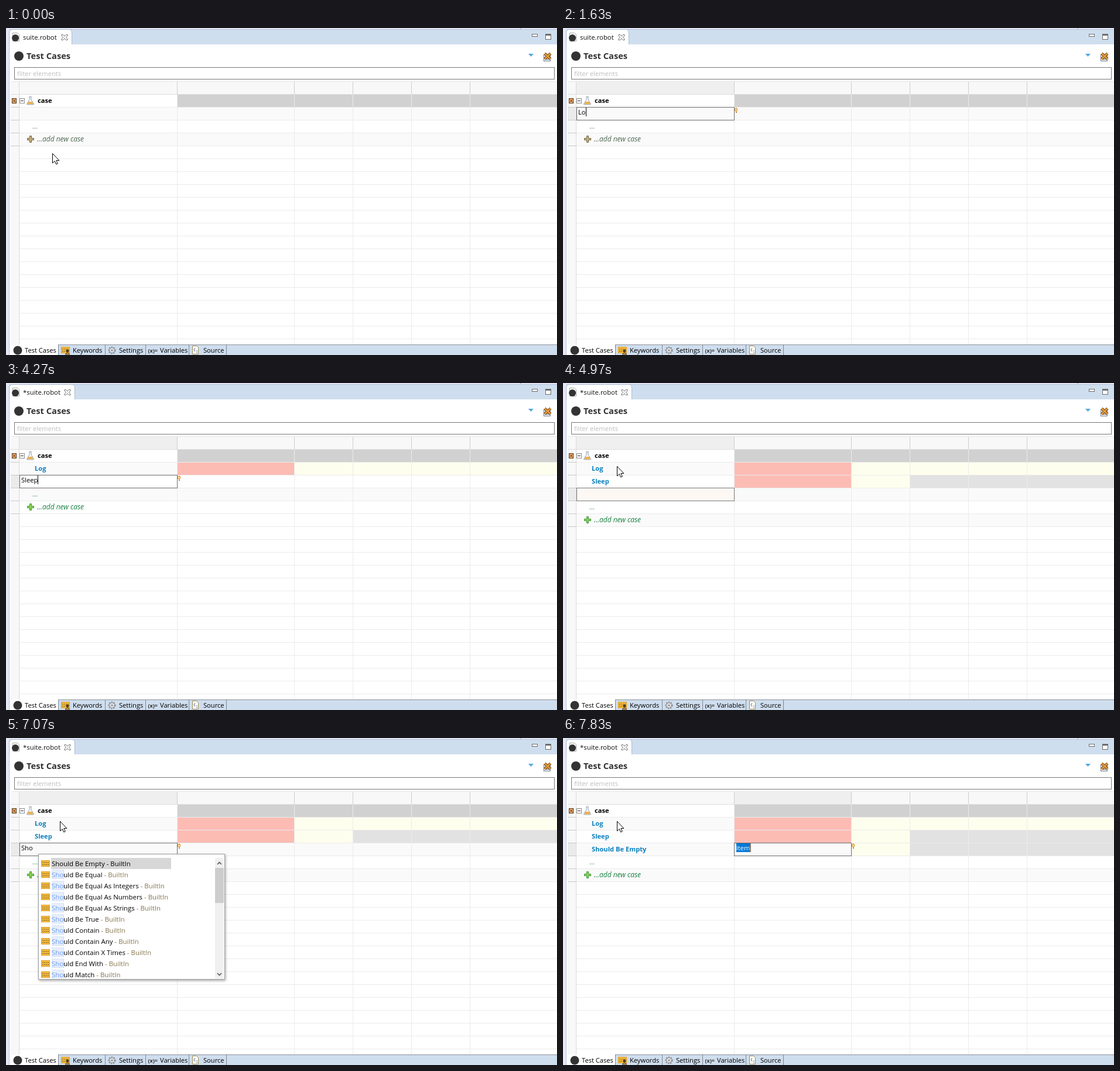
Animation of 941 by 559 pixels, one loop 8000 ms. Source, as an HTML page:

```html
<!DOCTYPE html>
<html lang="en">
<head>
<meta charset="utf-8">
<title>Test case editor</title>
<style>
html, body { margin: 0; width: 100%; height: 100%; overflow: hidden; background: #fff; }
svg { display: block; }
text { font: 11.15px "Open Sans", "Noto Sans", sans-serif; white-space: pre; }
rect { shape-rendering: crispEdges; }
.b { font-weight: 700; }
.tab { font-size: 11.35px; }
.h { font-size: 14.7px; font-weight: 700; }
.i { font-size: 11.95px; font-style: italic; }
.li { font-size: 11.45px; }
.doc { font: 13.2px "Liberation Sans", Arial, sans-serif; }
.doc.b { font-weight: 700; }
.doc.t { font-size: 15.5px; font-weight: 700; }
.code { font: 13.2px "Liberation Mono", monospace; }
.code.b { font-weight: 700; }
.pop { filter: drop-shadow(1px 2px 2px rgba(0,0,0,.35)); }
</style>
</head>
<body>
<svg id="stage" width="941" height="559" viewBox="0 0 941 559" xmlns="http://www.w3.org/2000/svg"></svg>
<script>
const LOOP = 8000, W = 941, TOP = 113, ROW = 22;
const COLS = [22, 292, 492, 592, 692, 792, W];
const BLUE = '#0a7fbd', PINK = '#fcbcb4', CREAM = '#fefeee', GREY = '#e2e2e2', LINK = '#c2401f';
const stage = document.getElementById('stage');

const edits = [
  { row: 1, word: 'Log', at: [1380, 1630, 1860], end: 2390 },
  { row: 2, word: 'Sleep', at: [3630, 3860, 4030, 4180, 4270], end: 4970 },
  { row: 3, word: 'Sho', at: [5750, 6130, 6220], end: 7760 }
];
const steps = [0, 70, 145, 220, 295, 370, 530, 2390, 2500, 4820, 4970, 6530, 7070, 7300, 7530, 7760, 7830]
  .concat(...edits.map(e => e.at)).sort((a, b) => a - b);
const proposals = ['Be Empty', 'Be Equal', 'Be Equal As Integers', 'Be Equal As Numbers', 'Be Equal As Strings',
  'Be True', 'Contain', 'Contain Any', 'Contain X Times', 'End With', 'Match'];

const within = (t, a, b) => t >= a && t < b;
const rowY = r => TOP + ROW * r;
const box = (x, y, w, h, fill, extra = '') => `<rect x="${x}" y="${y}" width="${w}" height="${h}" fill="${fill}" ${extra}/>`;
const frame = (x, y, w, h, fill, stroke) => box(x + .5, y + .5, w - 1, h - 1, fill, `stroke="${stroke}"`);
const text = (x, y, s, cls = '', fill = '#000') => `<text x="${x}" y="${y}" class="${cls}" fill="${fill}">${s}</text>`;
const path = (d, fill, stroke = 'none', w = 1) => `<path d="${d}" fill="${fill}" stroke="${stroke}" stroke-width="${w}"/>`;
const dot = (x, y, r, fill) => `<circle cx="${x}" cy="${y}" r="${r}" fill="${fill}"/>`;

function keywordIcon(x, y) {
  return `<rect x="${x + .5}" y="${y + .5}" width="14" height="10" rx="1" fill="#f6bb3c" stroke="#dc9d27"/>` +
    path(`M${x + 2} ${y + 4}h11M${x + 2} ${y + 7.5}h2m1 0h5m1 0h2`, 'none', '#6d5420', 1)
      .replace('/>', ' stroke-dasharray="2 1"/>');
}

function closeIcon(x, y) {
  return path(`M${x - 5} ${y - 4.5}h2.5l2.5 2.5 2.5 -2.5h2.5v2l-2.7 2.5 2.7 2.5v2h-2.5l-2.5 -2.5 -2.5 2.5h-2.5v-2l2.7 -2.5 -2.7 -2.5z`,
    '#fff', '#6b6b6b');
}

function titleBar(dirty) {
  const right = dirty ? 118 : 113;
  return box(0, 0, W, 28, '#e6e9f5') + box(0, 0, 5, 559, '#e6e9f5') +
    box(878, 0, 2, 2, '#bcc6dc') +
    box(5, 2, W - 5, 26, '#cfdeee') + box(8, 2, W - 8, 1, '#b5c4dc') +
    box(5, 6, 1, 553, '#b9c5dd') +
    path(`M5.5 28V8Q5.5 3 11 2.5H${right - 5}Q${right - .5} 3 ${right - .5} 8V28`, '#fff', '#a9bad4') +
    path('M11.5 8.5h8l3 3v11h-11z', '#fff', '#a3a89e') + dot(16, 17, 6, '#333') +
    text(29, 20, (dirty ? '*' : '') + 'suite.robot', 'tab', '#111') +
    closeIcon(right - 13, 16) +
    frame(898, 10, 10, 5, '#fff', '#6c6c6c') +
    frame(921, 10, 10, 10, '#fff', '#6c6c6c') + box(921, 11, 10, 2, '#6c6c6c');
}

function heading() {
  return dot(22, 48, 8, '#333') + text(35, 53, 'Test Cases', 'h', '#333') +
    path('M892 44h9l-4.5 5z', '#55a8dc') +
    frame(918, 45, 12, 12, '#e9eef4', '#75808c') + path('M920 53.5h8M920 50.5h4', 'none', '#75808c') +
    path('M920 43.5l10 9.5M930 43.5l-10 9.5', 'none', '#6d4414', 4.6) +
    path('M920 43.5l10 9.5M930 43.5l-10 9.5', 'none', '#e59a3b', 2.6) +
    frame(14, 67, 923, 21, '#fff', '#777') + text(19, 82, 'filter elements', '', '#bdbdbd');
}

function bottomTabs() {
  const seps = [89, 169, 238, 312, 376].map(x => box(x, 541, 1, 18, '#7f868e')).join('');
  return box(6, 541, W, 18, '#fff') + box(89, 541, W - 89, 18, '#cfdeee') + box(89, 541, W - 89, 1, '#8b9199') + seps +
    dot(20, 551, 7.5, '#333') + text(32, 555, 'Test Cases') +
    keywordIcon(94, 545) + dot(105, 552, 2.5, '#4c3d20') + path('M101 558q4 -6 8 0z', '#e9a23a', '#4c3d20') +
    text(114, 555, 'Keywords') +
    `<circle cx="181" cy="551" r="5.5" fill="#e6e8ea" stroke="#84898f" stroke-width="2" stroke-dasharray="2.4 1.6"/>` +
    `<circle cx="181" cy="551" r="4.2" fill="#e6e8ea" stroke="#84898f"/>` + dot(181, 551, 1.6, '#84898f') +
    text(193, 555, 'Settings') +
    `<text x="242.5" y="555" class="b" style="font-size:9px" fill="#333">(x)=</text>` + text(263, 555, 'Variables') +
    path('M318.5 543.5h7l3 3v11h-10z', '#fffdf4', '#a08a5a') + path('M323 547l-2 3 2 3M325 552h2M325 555h2', 'none', '#4b6ea0') +
    text(337, 555, 'Source');
}

function caseRow() {
  const y = TOP + 11;
  return box(293, TOP + 1, W - 293, 21, '#d1d1d1') +
    frame(10, y - 4, 8, 9, '#ffd9a0', '#4b2c10') + path(`M11.8 ${y - 2}l4.4 5M16.2 ${y - 2}l-4.4 5`, 'none', '#a34b12', 1.6) +
    frame(23, y - 4, 9, 9, '#fff', '#8b8b8b') + box(25, y, 5, 1, '#333') +
    path('M39.5 117.5h4M40 117.5v5l-4.5 7.5q0 1 1 1h10q1 0 1 -1l-4.5 -7.5v-5', '#f6f9fc', '#8f9dac') +
    path('M38.5 126h6l2.3 4.3h-10.6z', '#eeb04c') +
    text(54, y + 4, 'case', 'b');
}

// argument cells: required, optional, then unused
function argCells(r, word) {
  const y = rowY(r) + 1, h = ROW - 1, open = word === 'Log';
  return box(293, y, 199, h, PINK) + box(493, y, open ? W - 493 : 99, h, CREAM) +
    (open ? '' : box(593, y, W - 593, h, GREY));
}

function grid(s) {
  const last = s.n + 2, [hx, hr] = [COLS[s.col], COLS[s.col + 1]];
  let g = box(8, 91, W - 8, 22, '#f8f8f8') + box(8, 91, 14, 450, '#f8f8f8') + box(8, 91, W - 8, 1, '#e9e9e9');
  if (s.selected) {
    g += box(hx + 1, 92, hr - hx - 1, 21, '#efefef') + box(8, rowY(s.row) + 1, 14, 21, '#ebebeb');
  }
  for (let r = 1; r <= last; r += 2) g += box(23, rowY(r) + 1, W - 23, 21, '#fafafa');
  g += caseRow();
  s.words.forEach((w, i) => g += argCells(i + 1, w));
  if (s.hover) g += box(23, rowY(s.hover) + 1, 269, 21, '#fef0e3');
  for (let y = rowY(1); y < 541; y += ROW) g += box(23, y, W - 23, 1, '#ebebeb');
  COLS.slice(0, 6).forEach(x => g += box(x, 92, 1, 21, '#cdcdcd') + box(x, 114, 1, 427, '#ebebeb'));
  g += box(8, TOP, W - 8, 1, '#dedede') + box(22, 92, 1, 449, '#dadada');
  for (let r = 0; r <= last; r++) g += box(8, rowY(r + 1), 15, 1, '#c9c9c9');
  if (s.selected && !s.editing) g += frame(23, rowY(s.row), 270, 23, s.hot ? '#fee4cb' : '#fef8f4', '#777');
  s.words.forEach((w, i) => g += text(49, rowY(i + 1) + 15, w, 'b', BLUE));
  const ink = s.dirty ? '#15803f' : '#4c6650', py = rowY(last) + 11;
  return g + text(45, rowY(last - 1) + 15, '...', '', ink) +
    path(`M40.5 ${py - 5.5}h3v4h4v3h-4v4h-3v-4h-4v-3h4z`, s.dirty ? '#8ed05c' : '#c9b183', s.dirty ? '#3c9636' : '#6a6440') +
    text(53, py + 4, '...add new case', 'i', ink);
}

function bulb(x, y) {
  return `<ellipse cx="${x}" cy="${y}" rx="1.9" ry="2.3" fill="#fff3cf" stroke="#dd8b26" stroke-width="1.2"/>` +
    box(x - 1, y + 3, 2, 2, '#b77a35');
}

function editor(s) {
  const y = rowY(s.row);
  return frame(23, y, 270, 23, s.row % 2 ? '#fafafa' : '#fff', '#6a6a6a') +
    `<text id="typed" x="26" y="${y + 13}">${s.typed}</text>` + bulb(295.5, y + 4.5) +
    (s.caret ? box(0, y + 1, 1, 15, '#000', 'id="caret"') : '');
}

function itemEditor() {
  const y = rowY(3);
  return frame(292, y, 201, 23, '#fafafa', '#6a6a6a') + box(296, y + 1, 24, 15, '#0078d7') +
    text(296, y + 13, 'item', '', '#fff') + box(320, y + 1, 1, 15, '#ff8728') + bulb(495.5, y + 4.5);
}

function proposalList() {
  let g = `<g class="pop">${frame(55, 198, 319, 215, '#fff', '#9d9d9d')}</g>` +
    `<clipPath id="view"><rect x="56" y="199" width="317" height="212"/></clipPath><g clip-path="url(#view)">`;
  proposals.forEach((p, i) => {
    const y = 214 + 19 * i;
    g += keywordIcon(60, y - 5);
    if (!i) g += box(77, y - 9, 205, 19, '#d7d7d7') + text(78, y + 5, `Should ${p} - BuiltIn`, 'li');
    else g += box(78.5, y - 7.5, 20, 15, '#e6eefc', 'stroke="#b8cdf3" stroke-dasharray="1 1"') +
      text(78, y + 5, `<tspan fill="#6f9df0">Sho</tspan>uld ${p}<tspan fill="#85754d"> - BuiltIn</tspan>`, 'li');
  });
  return g + '</g>' + box(357, 205, 15, 206, '#f0f0f0') + box(357, 222, 15, 60, '#cdcdcd') +
    path('M361 216l3.5 -3.5 3.5 3.5M361 402l3.5 3.5 3.5 -3.5', 'none', '#555', 1.6);
}

function docPopup() {
  const line = (x, y, w) => box(x, y, w, 1, LINK);
  return `<g class="pop">${frame(387, 199, 319, 215, '#fefee1', '#9d9d9d')}</g>` + keywordIcon(397, 218) +
    text(418, 229, 'Should Be Empty', 'doc t') +
    text(397.5, 261, 'Source:', 'doc b') +
    text(450, 262, `<tspan fill="${LINK}">BuiltIn</tspan> [<tspan fill="${LINK}">Documentation</tspan>]`, 'code', '#444') +
    line(450, 264, 56) + line(522, 264, 104) +
    text(397.5, 277, 'Arguments:', 'doc b') + text(477, 278, '[item, msg=None]', 'code', '#333') +
    text(397.5, 306, 'Verifies that the given item is empty.', 'doc') +
    text(397.5, 335, 'The length of the item is got using the', 'doc') +
    text(623, 335, 'Get Length', 'doc', LINK) + line(623, 337, 66) +
    text(397.5, 350, 'keyword. The default error message can be', 'doc') +
    text(397.5, 366, 'overridden with the', 'doc') + box(512, 355, 28, 15, '#e9e9df') +
    text(514, 367, 'msg', 'code b', '#444') + text(544, 366, 'argument.', 'doc');
}

function arrow(x, y) {
  return path(`M${x} ${y}v16.5l3.8 -3.5 2.4 5.4 2.6 -1.1 -2.4 -5.3h5z`, '#fff', '#000');
}

function pointer(t, x, y) {
  if (within(t, 1380, 1630)) return path('M90.5 136.5h2l1 1 1 -1h2M93.5 137v13M90.5 150.5h2l1 -1 1 1h2', 'none', '#222');
  const hidden = within(t, 1630, 2390) || within(t, 3860, 4970) || within(t, 6130, 6530);
  return hidden ? '' : arrow(x + .5, y + .5);
}

function sceneAt(t) {
  const edit = edits.find(e => within(t, e.at[0], e.end));
  const move = t < 70 ? 0 : Math.min(5, Math.floor((t - 70) / 75) + 1) / 5;
  const ease = move * move * (3 - 2 * move);
  const x = Math.round(79 + 13 * ease), y = Math.round(214 - 72 * ease);
  const hoverRow = Math.floor((y - TOP) / ROW);
  const n = t < 2500 ? 1 : t < 4970 ? 2 : 3;
  const s = {
    x, y, n, row: n,
    dirty: t >= 2390,
    selected: t >= 530,
    hover: t < 530 && hoverRow <= 3 ? hoverRow : 0,
    hot: t < 2500,
    col: t >= 7830 ? 1 : 0,
    words: [[2390, 'Log'], [4970, 'Sleep'], [7830, 'Should Be Empty']].filter(w => t >= w[0]).map(w => w[1]),
    caret: !within(t, 4820, 4970) && !within(t, 7070, 7530),
    typed: ''
  };
  if (edit) s.typed = edit.word.slice(0, edit.at.filter(a => a <= t).length);
  if (within(t, 7760, 7830)) s.typed = 'Should Be Empty';
  s.editing = s.typed || s.col;
  return s;
}

function draw(t) {
  const s = sceneAt(t);
  stage.innerHTML = box(0, 0, W, 559, '#fff') + titleBar(s.dirty) + heading() + grid(s) + bottomTabs() +
    (s.typed ? editor(s) : '') + (s.col ? itemEditor() : '') +
    (within(t, 6530, 7760) ? proposalList() : '') + (within(t, 7300, 7760) ? docPopup() : '') +
    pointer(t, s.x, s.y);
  const caret = document.getElementById('caret');
  if (caret) caret.setAttribute('x', 26 + Math.round(document.getElementById('typed').getComputedTextLength()));
}

let shown = -1;
function tick() {
  const t = performance.now() % LOOP;
  const step = steps.filter(a => a <= t).length;
  if (step !== shown) draw(t);
  shown = step;
  requestAnimationFrame(tick);
}
tick();
</script>
</body>
</html>
```
